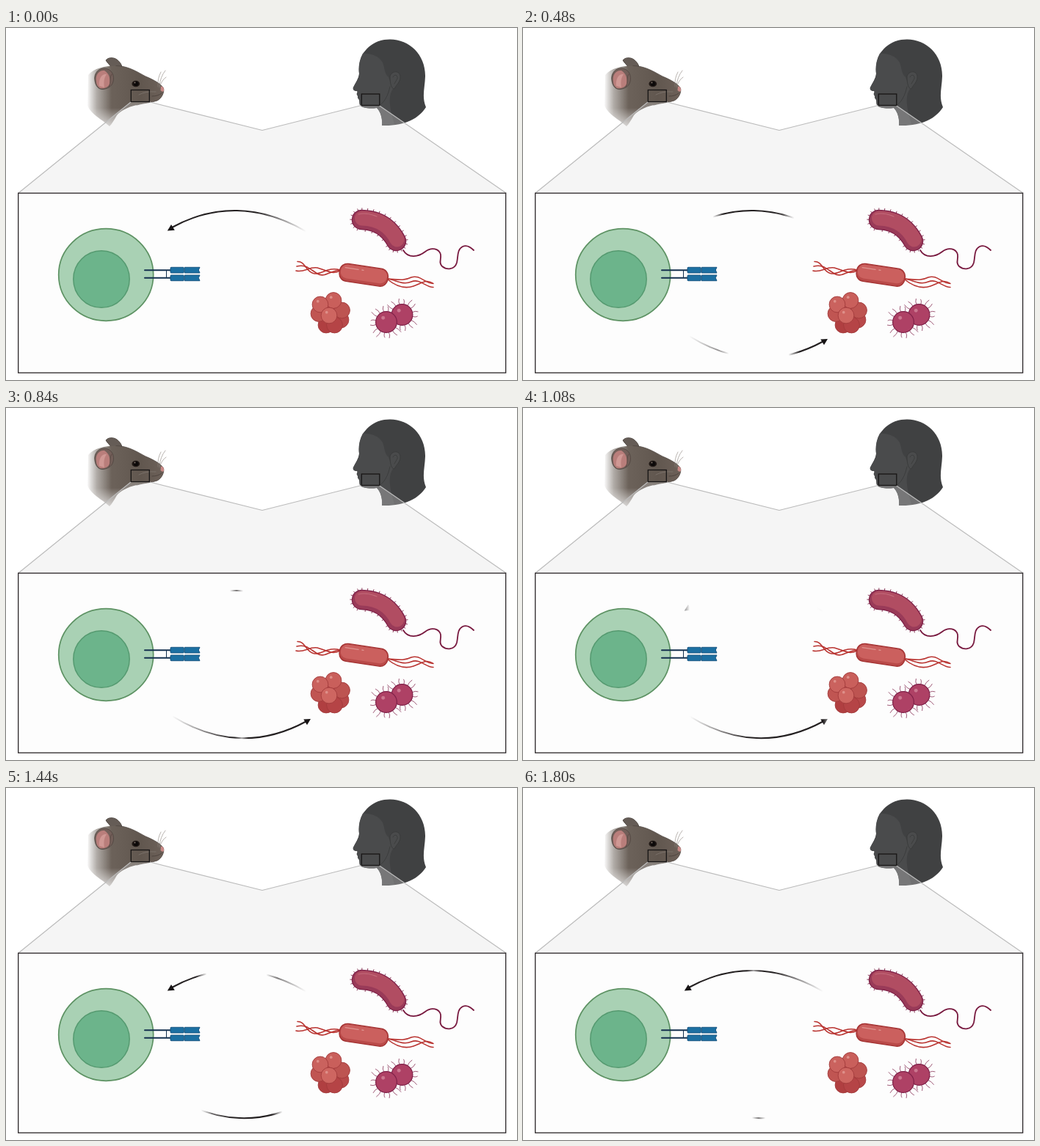
Write an HTML page that moves like this. It is 696x480 px and loops after 1.86 s.

```html
<!DOCTYPE html>
<html lang="en">
<head>
<meta charset="utf-8">
<title>Host cell and microbes</title>
<style>
  html, body { margin: 0; width: 100%; height: 100%; overflow: hidden; background: #fff; }
  svg { display: block; width: 696px; height: 480px; }
  .line { fill: none; stroke-linecap: round; stroke-linejoin: round; }
</style>
</head>
<body>
<svg viewBox="0 0 696 480">
  <defs>
    <linearGradient id="fur" gradientUnits="userSpaceOnUse" x1="110" y1="0" x2="215" y2="0">
      <stop offset="0" stop-color="#70675f" stop-opacity="0"/>
      <stop offset=".13" stop-color="#70675f" stop-opacity=".55"/>
      <stop offset=".32" stop-color="#6c625a"/>
      <stop offset=".7" stop-color="#61574f"/>
      <stop offset="1" stop-color="#6d6159"/>
    </linearGradient>
    <linearGradient id="furFade" x1="0" y1="0" x2="0" y2="1">
      <stop offset=".76" stop-color="#fff"/>
      <stop offset="1" stop-color="#fff" stop-opacity=".35"/>
    </linearGradient>
    <mask id="neckFade"><rect x="100" y="30" width="130" height="104" fill="url(#furFade)"/></mask>
    <linearGradient id="topInk" gradientUnits="userSpaceOnUse" x1="340" y1="0" x2="409" y2="0">
      <stop offset="0" stop-color="#231f20"/>
      <stop offset="1" stop-color="#231f20" stop-opacity="0"/>
    </linearGradient>
    <linearGradient id="lowInk" gradientUnits="userSpaceOnUse" x1="226" y1="0" x2="308" y2="0">
      <stop offset="0" stop-color="#231f20" stop-opacity="0"/>
      <stop offset="1" stop-color="#231f20"/>
    </linearGradient>
    <linearGradient id="topWipe" gradientUnits="userSpaceOnUse" x1="314" y1="0" x2="434" y2="0" spreadMethod="reflect">
      <stop stop-color="#fff"/><stop stop-color="#fff"/>
    </linearGradient>
    <linearGradient id="lowWipe" gradientUnits="userSpaceOnUse" x1="321" y1="0" x2="441" y2="0" spreadMethod="reflect">
      <stop stop-color="#fff"/><stop stop-color="#fff"/>
    </linearGradient>
    <mask id="topMask" maskUnits="userSpaceOnUse" x="200" y="235" width="230" height="55">
      <rect x="200" y="235" width="230" height="55" fill="url(#topWipe)"/>
    </mask>
    <mask id="lowMask" maskUnits="userSpaceOnUse" x="205" y="410" width="230" height="55">
      <rect x="205" y="410" width="230" height="55" fill="url(#lowWipe)"/>
    </mask>
  </defs>

  <!-- mouse -->
  <g>
    <path d="M136 44C139 40 146 39.500 151 43C155 46 157 49 158 53L143 54C142 50 138 48 136 44Z" fill="#655c56" stroke="#4b433e" stroke-width=".9"/>
    <path d="M112 64C119 55 135 51.500 150 51.500C166 51.500 179 60 190 66C200 70 211 76 214.500 82C216 88 212 96 206 99C198 102 188 102 178 105C165 108 156 113 151 119C147 126 144 131 141 134C130 124 116 118 111 106Z" fill="url(#fur)" mask="url(#neckFade)"/>
    <path d="M150 51.500C166 51.500 179 60 190 66C200 70 211 76 214.500 82C216 88 212 96 206 99C198 102 188 102 178 105" class="line" stroke="#4f4640" stroke-width=".8"/>
    <path d="M121 72C119 61 127 54 135 55C143 56 147 63 146.500 70C146 78 140 83 132 83.500C126 84 122 79 121 72Z" fill="#725f59" stroke="#4e443f" stroke-width=".8"/>
    <path d="M123 73C121 63 128 57 134 58C141 62 142 70 142 76C138 82 132 83 128 82C125 80 123 77 123 73Z" fill="#b97e7b"/>
    <path d="M127 79C126 70 130 62 137 63C133 69 133 75 134 81" fill="#cf9894"/>
    <path d="M144 63C140 68 144 73 140 80" class="line" stroke="#5b4843"/>
    <ellipse cx="176.800" cy="76" rx="5.400" ry="4.300" fill="#201815"/>
    <ellipse cx="177" cy="76" rx="3.300" ry="3" fill="#0c0909"/>
    <circle cx="175.500" cy="74.500" r=".9" fill="#8d7d73"/>
    <path d="M211 79.500Q216 80 215 86Q213 88 210.500 85Z" fill="#c88986"/>
    <g class="line" stroke="#8a817b" stroke-width=".6">
      <path d="M207 80Q206 69 211 60M209 79Q210 67 217 58M209 81Q212 71 218 67M204 87Q190 86 181 91"/>
    </g>
    <path d="M212 89Q207 93 199 93" class="line" stroke="#483e39" stroke-width=".8"/>
  </g>

  <!-- head silhouette -->
  <g>
    <path d="M486 35C496 21 508 15.500 523 15.500C550 15.500 571.500 37 571 66C570.500 82 566 94 572 108C562 124 542 134 512 133C513 123 510 114 505 109C497 110 486 110 482 105C481 102 482 99 480.500 97C478 95 480 93 478 91C477 89 480 87 478 86C474 86 472 84 473 81C476 75 481 68 481 62C480 54 481 44 486 35Z" fill="#404142"/>
    <path d="M486 35C495 34 508 38 513 47C516 54 515 62 521 67L527 83C521 92 521 105 529 131Q520 133 512 133C513 123 510 114 505 109C497 110 486 110 482 105C481 102 482 99 480.500 97C478 95 480 93 478 91C477 89 480 87 478 86C474 86 472 84 473 81C476 75 481 68 481 62C480 54 481 44 486 35Z" fill="#4a4b4c"/>
    <path d="M523 66C525 58 537 57 537 67C537 74 531 78 529 83C525 83 523 76 523 66Z" fill="#4a4b4c" stroke="#383939" stroke-width=".8"/>
    <path d="M527 67C529 62 534 64 533 69L529 76M523 80C520 93 516 101 506 108" class="line" stroke="#393a3a" stroke-width=".8"/>
  </g>

  <path d="M17 225L170 101L196 101L349 139.500L484 105.500L508 105.500L681 225Z" fill="#dedede" fill-opacity=".3"/>
  <path d="M17 225L170 101M196 101L349 139.500L484 105.500M508 105.500L681 225" class="line" stroke="#bcbcbc" stroke-width="1.200"/>
  <g fill="none" stroke="#171515" stroke-width="1.300">
    <rect x="170.300" y="84.500" width="25" height="16"/>
    <rect x="484.300" y="90" width="24.500" height="15.500"/>
    <rect x="16.700" y="225.200" width="664" height="245" fill="#fdfdfd" stroke="#2b2628"/>
  </g>

  <!-- host cell and receptor -->
  <ellipse cx="136.200" cy="336.500" rx="64.500" ry="62.800" fill="#a9d1b4" stroke="#5d9263" stroke-width="1.700"/>
  <ellipse cx="130" cy="342.500" rx="38.200" ry="38.800" fill="#6cb48b" stroke="#559a70" stroke-width="1.500"/>
  <path d="M189 330.200H224M189 340.700H224" class="line" stroke="#14304f" stroke-width="2"/>
  <path d="M218.500 330V341" stroke="#14304f"/>
  <g id="chain" fill="#1d70a2" stroke="#124f7b" stroke-width=".9">
    <rect x="224" y="326.300" width="18.300" height="7.700" rx="1"/>
    <path d="M243.300 326.300H264L262.300 330L264 334H243.300Z"/>
  </g>
  <use href="#chain" y="10.700"/>

  <!-- arrows -->
  <g mask="url(#topMask)">
    <path d="M226 272C283 240.500 345 240.500 408 277" fill="none" stroke="url(#topInk)" stroke-width="2"/>
    <path d="M219.800 276.500L225 268L229.800 275.700Z" fill="#171415"/>
  </g>
  <g mask="url(#lowMask)">
    <path d="M227 420.500C287 457.500 349 460 408.500 427.500" fill="none" stroke="url(#lowInk)" stroke-width="2"/>
    <path d="M415 424L405.300 424.400L410 432.300Z" fill="#171415"/>
  </g>

  <!-- curved bacterium -->
  <g class="line">
    <path id="spikes" stroke="#7b2346" stroke-width=".9"/>
    <path d="M541 303C548 315 562 312 571 305C580 298 590 301 592 309C593 316 589 320 594 325C600 330 611 330 614 320C616 312 614 302 622 298C628 295 633 299 637 303" stroke="#78193f" stroke-width="1.800"/>
    <path id="spine" d="M484.500 261.500Q516 262 531.500 290.500" stroke="#7f2148" stroke-width="27.500"/>
    <path d="M484.500 261.500Q516 262 531.500 290.500" stroke="#993a58" stroke-width="25"/>
    <path d="M485 259.500Q518 260 532.500 288.500" stroke="#b14d62" stroke-width="20"/>
    <path d="M480 254Q491 251 505 257" stroke="#c46c7c" stroke-width="1.200"/>
  </g>

  <!-- rod -->
  <g class="line" stroke="#b93431" stroke-width="1.600">
    <path d="M455 330C440 325 430 336 420 335C408 333 408 318 397 318.500"/>
    <path d="M455 330C441 331 434 341 424 335C413 328 408 322 396 325"/>
    <path d="M455 331C444 337 436 330 424 327C413 325 406 334 395 331"/>
    <path d="M520 342C534 343 542 345 552 340C564 336 570 348 582 348.500"/>
    <path d="M520 342C532 344 541 351 552 346C564 341 572 354 582 353.500"/>
    <path d="M520 343C531 352 543 356 555 352C567 348 572 342 581 348"/>
  </g>
  <g transform="rotate(8.500 487.400 336.800)">
    <rect x="454" y="324.700" width="66.500" height="24.200" rx="10.500" fill="#b94a49" stroke="#a33131" stroke-width="1.300"/>
    <rect x="455.500" y="326" width="63.500" height="19" rx="9" fill="#cb605e"/>
    <path d="M461 330.500H479M484 330.500H486" class="line" stroke="#df9490" stroke-width="1.400"/>
  </g>

  <g id="cluster" stroke="#a23a3b" stroke-width=".9"></g>
  <path id="hairs" class="line" stroke="#8a3458" stroke-width=".8"/>
  <g id="pair" stroke="#7f2148" stroke-width="1.200"></g>
</svg>
<script>
const $ = id => document.getElementById(id);

function ball(parent, x, y, r, fill, shine) {
  const add = (cx, cy, radius, attrs) => {
    const c = document.createElementNS("http://www.w3.org/2000/svg", "circle");
    Object.entries({ cx, cy, r: radius, ...attrs }).forEach(([k, v]) => c.setAttribute(k, v));
    parent.append(c);
  };
  add(x, y, r, { fill });
  if (shine) add(x - r * .3, y - r * .4, r * .17, { fill: shine, stroke: "none" });
}

[[442, 386, "#b8494a"], [456, 398, "#b8494a"], [436, 405, "#b03f41"], [447.5, 405, "#b54446"],
 [426, 389.5, "#c05552"], [457.5, 385, "#bd5451"], [446, 371.5, "#c95f5b"],
 [428, 377, "#ca625e"], [440, 392, "#ce6661"]]
  .forEach(([x, y, fill], i) => ball($("cluster"), x, y, 10.9, fill, i > 5 && "#de908a"));

const cocci = [[539.5, 391], [518, 401]];
cocci.forEach(([x, y]) => ball($("pair"), x, y, 14.4, "#ae4165", "#cb7890"));

// Fine hairs around both cocci; those between the two stay hidden.
let hairs = "";
cocci.forEach(([x, y], k) => {
  const other = cocci[1 - k];
  for (let i = 0; i < 16; i++) {
    const a = i * Math.PI / 8 + .15;
    const at = (r, turn) => [x + r * Math.cos(a + turn), y + r * Math.sin(a + turn)];
    const tip = at(21 + i * 7 % 4, .05 * (i % 2 ? 1 : -1));
    if (Math.hypot(tip[0] - other[0], tip[1] - other[1]) > 21)
      hairs += `M${at(14, 0)}Q${at(19, i % 2 ? -.06 : .06)} ${tip}`;
  }
});
$("hairs").setAttribute("d", hairs);

// Short spikes along both sides and around both ends of the spine.
const spine = $("spine"), total = spine.getTotalLength();
let spikes = "";
function spike(s, turn) {
  const p = spine.getPointAtLength(s);
  const a = spine.getPointAtLength(Math.max(0, s - 1));
  const b = spine.getPointAtLength(Math.min(total, s + 1));
  const dir = Math.atan2(b.y - a.y, b.x - a.x) + turn;
  const at = r => [p.x + r * Math.cos(dir), p.y + r * Math.sin(dir)];
  spikes += `M${at(13)}L${at(15.7)}`;
}
for (let i = 0; i <= 9; i++) {
  spike(total * i / 9, -Math.PI / 2);
  if (i % 2) spike(total * i / 9, Math.PI / 2);
}
for (let i = 1; i < 8; i++) {
  spike(0, Math.PI / 2 + i * Math.PI / 8);
  spike(total, -Math.PI / 2 + i * Math.PI / 8);
}
$("spikes").setAttribute("d", spikes);

// Soft-edged split wipe: one arrow closes to its middle while the other fills in.
const LOOP = 1860, TICK = 60, SWAP = 960, SOFT = 15, SPEED = .129, REACH = 110;
const clamp = v => Math.min(1, Math.max(0, v));

function setWipe(id, edge, inside) {
  const lo = edge - SOFT / 2, hi = edge + SOFT / 2;
  const core = clamp(hi / SOFT);
  const [a, b] = $(id).children;
  a.setAttribute("offset", clamp(lo / 120));
  b.setAttribute("offset", clamp(hi / 120));
  a.setAttribute("stop-opacity", inside ? core : 1 - core);
  b.setAttribute("stop-opacity", inside ? 0 : 1);
}

function draw(now) {
  const t = Math.floor(now % LOOP / TICK) * TICK;
  const first = t < SWAP;
  const edge = REACH - SPEED * (first ? t : t - SWAP);
  setWipe("topWipe", edge, first);
  setWipe("lowWipe", edge, !first);
}

const start = performance.now();
function loop() {
  draw(performance.now() - start);
  requestAnimationFrame(loop);
}
loop();
</script>
</body>
</html>
```
